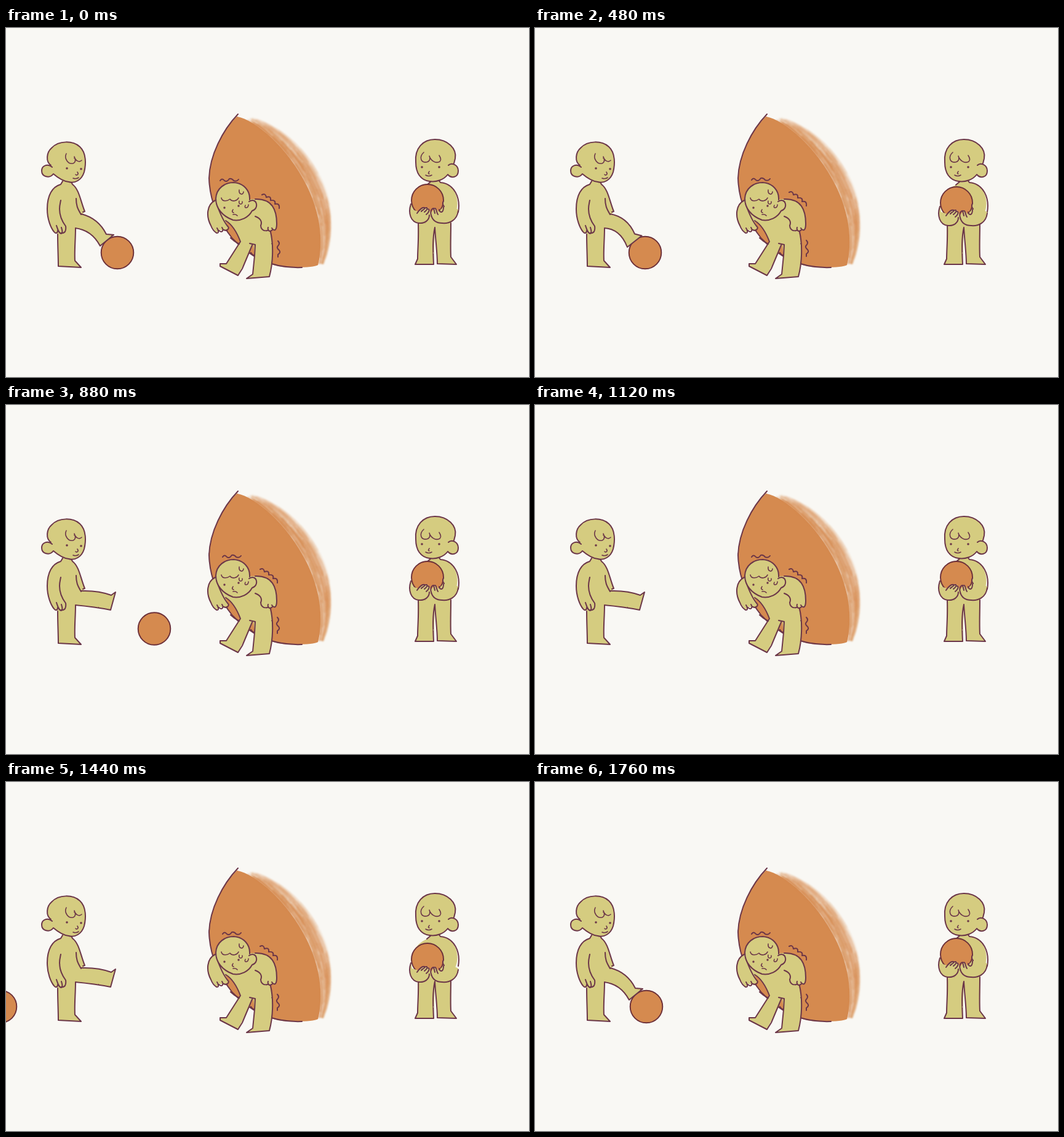
An HTML page for the animation above (1840 ms loop, 850 by 567 pixels).

```html
<!DOCTYPE html>
<html lang="en">
<head>
<meta charset="utf-8">
<title>Three ways to handle a ball</title>
<style>
html, body { margin: 0; width: 100%; height: 100%; overflow: hidden; background: #f9f8f4; }
svg { display: block; width: 100vw; height: 100vh; }
path, circle { stroke-linecap: round; stroke-linejoin: round; }
.skin { fill: #d5cc80; }
.ball { fill: #d58a4f; stroke: #6b2f38; stroke-width: 1.9; }
.line { fill: none; stroke: #6b3648; stroke-width: 2; }
.both { fill: #d5cc80; stroke: #6b3648; stroke-width: 2; }
.thin { fill: none; stroke: #6b3648; stroke-width: 1.6; }
.dot { fill: #6b3648; }
</style>
</head>
<body>
<svg viewBox="0 0 850 567">
  <filter id="pencil" filterUnits="userSpaceOnUse" x="0" y="0" width="850" height="567" color-interpolation-filters="sRGB">
    <feTurbulence type="fractalNoise" baseFrequency=".3" numOctaves="2" seed="4"/>
    <feDisplacementMap in="SourceGraphic" scale="1.4" xChannelSelector="R" yChannelSelector="G"/>
  </filter>
  <filter id="soft" filterUnits="userSpaceOnUse" x="300" y="100" width="280" height="320" color-interpolation-filters="sRGB">
    <feGaussianBlur stdDeviation=".9"/>
  </filter>

  <circle id="rollBall" class="ball" r="26.3"/>

  <!-- huge ball -->
  <path id="core" fill="#d58a4f"/>
  <g id="streaks" fill="none" stroke="#d58a4f" filter="url(#soft)"></g>
  <path class="line" filter="url(#pencil)" d="M377 140C352 166 331 207 330 244C331 279 345 313 368 342C395 370 428 391 481 389"/>

  <!-- kicker -->
  <g filter="url(#pencil)">
    <path class="skin" d="M91 248L90 254C75 258 67 272 67 294C67 311 73 325 78 331L84 334L85 387L122 389L112 378L112 326L124 303L128 298C121 281 119 262 108 254L108 247Z"/>
    <path id="leg" class="both"/>
    <path class="skin" d="M84 300L122 301L113 325L112 330L84 332Z"/>
    <path class="line" d="M92 249L89 254C75 258 67 272 67 294C67 311 73 325 78 331C81 335 84 333 84 329M82 321C84 327 86 334 90 334C93 332 91 328 90 324M90 333C96 334 98 329 97 322C91 314 87 306 87 294C87 288 88 285 89 280M106 250L108 254C119 262 121 281 128 298L125 299M114 277C114 288 116 293 122 303M84 335C84 355 85 371 85 387L122 389L112 378C111 362 113 344 113 325"/>
    <path class="both" d="M73 223C64 217 66 202 74 195C86 182 109 183 120 193C131 203 130 222 127 234C123 247 112 253 102 250C92 249 84 243 77 237C71 245 58 242 58 232C58 223 68 220 75 226"/>
    <path class="thin" d="M98 204C94 212 101 222 109 220C114 218 113 213 111 209C113 216 119 219 123 215M116 234C119 238 115 240 113 238M109 244Q114 246 118 243"/>
    <circle class="dot" cx="99" cy="228" r="1.8"/><circle class="dot" cx="122" cy="229" r="1.8"/>
  </g>

  <!-- carrier -->
  <g filter="url(#pencil)">
    <path class="skin" d="M340 280C326 288 324 306 333 321L342 333L347 328L356 329L362 324L357 315C367 322 375 333 381 347L358 383L348 383L348 387L377 402L402 352L404 370L401 400L391 407L428 404C432 384 436 353 428 329L438 328L440 318C440 297 436 280 405 278Z"/>
    <path fill="#d58a4f" d="M357 314C369 320 376 334 380 347C371 343 364 332 360 326L362 323Z"/>
    <path class="line" d="M340 280C326 287 325 306 333 321Q336 329 342 333C347 334 345 328 343 325M346 329C352 334 354 328 351 324M354 328C360 331 363 325 361 323C354 315 348 302 342 285M357 313C369 320 376 334 381 347L358 383L348 383L348 387L377 402L384 391Q392 372 400 353M396 350L405 352L404 370L401 400L391 407L428 404C434 382 435 353 430 331M405 278C433 277 440 296 440 318C440 329 436 331 432 325M433 328C427 333 425 327 426 324M425 329C417 331 414 325 414 321C417 314 413 309 405 306M365 341Q371 347 379 351M404 370Q400 369 398 365"/>
    <path class="both" d="M395 282C408 274 412 294 400 297C394 308 382 314 369 312C352 306 341 293 341 277C342 260 356 251 370 251C386 252 397 264 396 279"/>
    <path class="thin" d="M350 276C351 282 359 282 364 278C368 283 375 281 378 276M379 263C378 271 386 272 386 266M379 281C377 287 385 288 384 282M389 288C386 294 394 293 394 287M369 295Q366 299 370 300M369 303Q374 302 376 305"/>
    <circle class="dot" cx="355" cy="292" r="1.7"/><circle class="dot" cx="378" cy="289" r="1.7"/>
    <g class="line">
      <path id="shakeTop" d="M352 247Q355 242 359 247Q363 250 367 244Q371 243 374 247Q379 249 382 245"/>
      <path id="shakeSide" d="M413 267Q419 264 420 271Q428 268 427 276Q436 275 434 282Q442 280 441 289"/>
      <path id="shakeLow" d="M441 345Q445 349 441 353Q438 356 443 360Q446 364 441 367L441 371"/>
    </g>
  </g>

  <!-- holder -->
  <g filter="url(#pencil)">
    <path class="skin" d="M689 247L687 254C672 259 660 272 658 290L669 309L669 375L665 384L695 384L697 324L701 383L732 384L723 372L724 310C740 295 737 254 706 251L705 245Z"/>
    <path class="line" d="M691 249L684 255M703 247L706 251C729 253 739 276 735 299M670 318C671 340 669 360 669 375L665 384L695 384C694 362 693 342 697 324C698 345 701 365 701 383L732 384L723 372C722 354 723 335 723 317"/>
    <path class="both" d="M719 223C724 218 735 222 735 232C735 243 724 245 718 238C712 246 700 251 688 249C674 247 666 236 666 218C664 195 678 181 697 181C718 181 733 196 730 212L728 220"/>
    <path class="thin" d="M679 202C671 209 674 219 683 218C689 217 690 212 688 208C690 215 698 221 705 217C708 214 706 210 704 207M688 233Q685 237 688 237M682 239Q687 242 692 239"/>
    <circle class="dot" cx="676" cy="226" r="1.8"/><circle class="dot" cx="704" cy="226" r="1.8"/>
    <g id="hold">
      <circle class="ball" cx="685" cy="280" r="26"/>
      <path class="skin" d="M658 286C653 301 658 316 671 317C681 318 688 312 691 305C694 313 698 318 710 317C725 317 734 308 735 295L711 282L711 291L703 298L697 292L691 300L686 292L679 291L670 298L660 295Z"/>
      <path class="line" d="M658 286C653 301 658 316 671 317C681 318 688 312 688 304M668 301C672 295 677 291 680 292C682 294 676 296 675 298M680 293C687 290 685 295 680 299M685 294C690 294 687 300 683 303M735 297C733 313 720 318 709 317C699 317 693 312 691 304C689 298 692 293 695 293L697 301M697 293C700 293 699 299 702 303M704 295C705 301 711 301 711 291M711 281C709 285 710 288 712 290"/>
    </g>
  </g>
</svg>
<script>
const el = id => document.getElementById(id);
const STEP = 80, COUNT = 23, AWAY = -200;

// one value per step
const ballX = [181, 179, 176.5, 174.5, 174, 174, 179, 183, 189, 199, 215, 241, 300, 370,
  AWAY, AWAY, AWAY, -90, -9, 61, 113, 153, 181];
const legPose = [0, -.4, -1, -1.4, -1.5, -1.5, -.5, 0, .25, .55, .85, 1, 1, 1, 1, 1, 1, 1, 1, .9, .6, .25, 0];
const dip = [0, 2, 4, 6, 8, 8, 4, 2];

// knee, ankle, toe, heel, underside
const back = [150, 305, 161, 334, 172, 339, 147, 358, 138, 324];
const rest = [150, 309, 163, 335, 175, 336, 153, 354, 139, 328];
const kick = [150, 301, 171, 309, 178, 304, 170, 333, 145, 328];

function legPath(p) {
  const to = p < 0 ? back : kick, k = Math.abs(p);
  const v = rest.map((a, i) => a + (to[i] - a) * k);
  return `M122 302Q${v.slice(0, 4)}L${v.slice(4, 6)}L${v.slice(6, 8)}Q${v.slice(8)} 112 325`;
}

// right side of the huge ball, moved inwards by d
const edge = d => `376 144C${436 - d} ${146 + d * .5} ${550 - d * 1.2} ${262 + d * .3} ${511 - d * .3} 385`;

function paintBrush() {
  let seed = 7;
  const rnd = () => (seed = seed * 16807 % 2147483647) / 2147483647;
  el("core").setAttribute("d", `M${edge(13)}Q500 389 470 389C428 391 395 370 368 342C345 313 331 279 330 244C331 207 352 166 376 143Z`);
  let out = "";
  for (let i = 0; i < 130; i++) {
    const d = 13 - 28 * rnd() ** 1.2, start = 6 + rnd() * 74, len = 8 + rnd() * 35;
    const alpha = Math.max(.08, .25 + d * .014);
    out += `<path d="M${edge(d)}" pathLength="100" stroke-width="${1.5 + rnd() * 3}" opacity="${alpha}"
      stroke-dasharray="${Math.min(len, 99 - start)} 200" stroke-dashoffset="${-start}"/>`;
  }
  el("streaks").innerHTML = out;
}

const move = (id, x, y) => el(id).setAttribute("transform", `translate(${x} ${y})`);

function draw(i) {
  move("rollBall", ballX[i], ballX[i] > 200 ? 363.5 : 365);
  el("leg").setAttribute("d", legPath(legPose[i]));
  move("hold", 0, dip[i % 14] || 0);
  const s = i % 4 < 2 ? 1 : 0;
  move("shakeTop", -4 * s, s);
  move("shakeSide", 3 * s, 4 * s);
  move("shakeLow", s, s);
}

paintBrush();
const begin = performance.now();
let last = -1;
function tick() {
  const i = Math.floor((performance.now() - begin) / STEP) % COUNT;
  if (i !== last) draw(last = i);
  requestAnimationFrame(tick);
}
tick();
</script>
</body>
</html>
```
